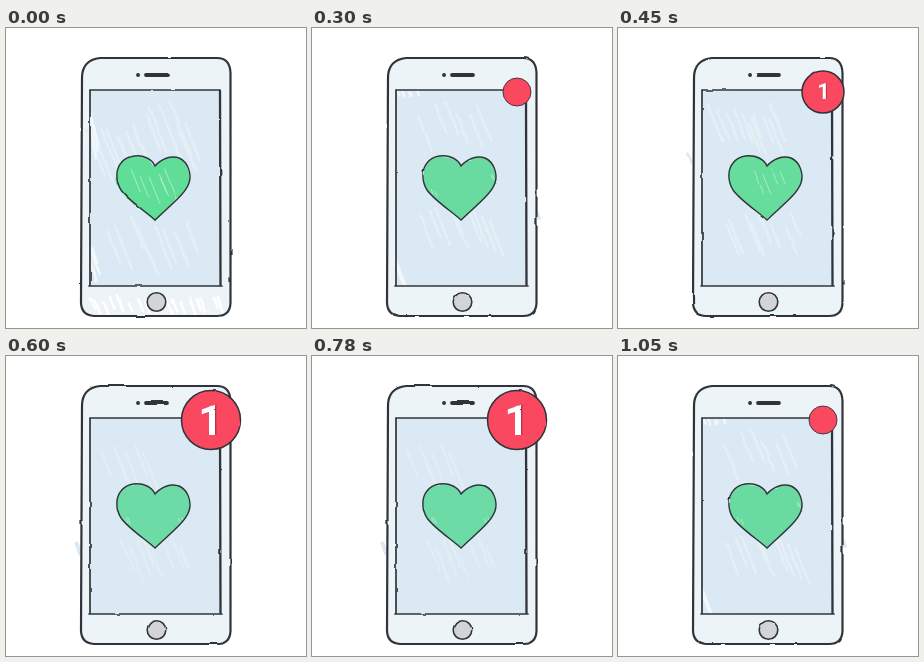
An HTML page that plays this animation: 300 px wide and 300 px high, repeating every 1.2 s.

```html
<!DOCTYPE html>
<html>
<head>
<meta charset="utf-8">
<style>
html, body { margin: 0; width: 100%; height: 100%; overflow: hidden; background: #fff; }
svg { display: block; width: 100vw; height: 100vh; }
text { font-family: Roboto, sans-serif; font-weight: bold; text-anchor: middle; }
</style>
</head>
<body>
<svg id="stage" viewBox="0 0 300 300"></svg>
<script>
const INK = '#30343a', PALE = '#f2f7fa', BLUE = '#dbe9f4';
const BODY = 'M94 30H211Q224 30 224.5 45V275Q224 288 211 288H88Q75 287 75 274L76 50Q76 32 94 30Z';
const HEART = 'M149 192C139 183 122 172 115 162C109 152 110 141 115 135C121 127 133 126 141 130' +
  'Q147 133 149 138C155 131 165 127 173 130C182 134 186 146 183 155C179 167 161 180 149 192Z';

// hatches: x, y, count, spread, length, colour
const poses = [
  { green: '#60de97', shift: '-.5 .8', badge: 0, hatches: [
    [110, 135, 6, 40, 60, '#e4eff7'], [160, 112, 8, 70, 50, '#e4eff7'], [150, 215, 8, 90, 44, '#e4eff7'],
    [87, 112, 3, 4, 44, PALE], [87, 232, 3, 4, 34, PALE], [150, 278, 18, 136, 15, '#fff']],
    nicks: [[150, 158, 6, 44, 28]] },
  { green: '#69daa0', shift: '.5 .5', badge: 14, hatches: [
    [145, 98, 7, 64, 38, '#e4eff6'], [150, 200, 9, 84, 40, '#e4eff6'],
    [87, 240, 3, 5, 22, PALE], [98, 65, 4, 24, 5, PALE], [226, 187, 2, 2, 7, BLUE]],
    nicks: [[122, 165, 2, 8, 6], [180, 150, 2, 4, 8]] },
  { green: '#66dc9d', shift: '0 0', badge: 21, size: 22, digit: [205.5, 71], hatches: [
    [118, 92, 6, 42, 34, '#e5eff6'], [149, 103, 5, 34, 38, '#e5eff6'], [145, 205, 8, 78, 34, '#e5eff6'],
    [71, 130, 2, 2, 8, BLUE]],
    nicks: [[155, 152, 4, 30, 20]] },
  { green: '#6ddba5', shift: '0 .5', badge: 29.5, size: 43, digit: [204.5, 78.5], hatches: [
    [125, 108, 6, 50, 34, '#e3edf5'], [149, 202, 8, 70, 32, '#e3edf5'], [72, 190, 2, 2, 10, BLUE]],
    nicks: [[122, 166, 2, 8, 6], [176, 166, 2, 6, 6]] }
];

function random(seed) {
  return () => (seed = (seed * 16807) % 2147483647) / 2147483647;
}

function hatch([x, y, count, spread, length, colour = '#b9f0d0'], rnd, width) {
  let d = '';
  for (let i = 0; i < count; i++) {
    const cx = x + ((i + rnd()) / count - .5) * spread;
    const cy = y + (rnd() - .5) * length * .5;
    const h = length * (.3 + rnd() * .25);
    const lean = Math.min(h * .4, spread);
    d += `M${cx - lean} ${cy - h}L${cx + lean} ${cy + h}`;
  }
  return `<path d="${d}" fill="none" stroke="${colour}" stroke-width="${width}" stroke-linecap="round"/>`;
}

function roughen(id, seed, wobble) {
  return `<filter id="${id}" filterUnits="userSpaceOnUse" x="0" y="0" width="300" height="300"
      color-interpolation-filters="sRGB">
    <feTurbulence type="fractalNoise" baseFrequency=".05" numOctaves="2" seed="${seed}"/>
    <feDisplacementMap in="SourceGraphic" scale="${wobble}" xChannelSelector="R" yChannelSelector="G"/>
    <feGaussianBlur stdDeviation=".35"/>
  </filter>`;
}

function badge({ badge: r, size, digit }) {
  if (!r) return ['', ''];
  const disc = `<circle cx="205" cy="64" r="${r}" fill="#fb4861"/>`;
  let lines = `<circle cx="205" cy="64" r="${r}" stroke-width="${r > 14 ? 1.5 : .9}"/>`;
  if (digit) {
    const one = (dx, fill) =>
      `<text x="${digit[0] + dx}" y="${digit[1]}" font-size="${size}" fill="${fill}" stroke="none">1</text>`;
    lines += one(size / 30, '#a92c40') + one(0, '#fff');
  }
  return [disc, lines];
}

function draw(pose, i) {
  const rnd = random(731 + i * 97);
  const [disc, rim] = badge(pose);
  return `<g>
    ${roughen('fill' + i, 3 + i, 3)}${roughen('line' + i, 20 + i, 2)}
    <g filter="url(#fill${i})">
      <path d="${BODY}" fill="#edf4f8"/>
      <path d="M84 62H214V258H84Z" fill="${BLUE}"/>
      ${pose.hatches.map(h => hatch(h, rnd, 2.5)).join('')}
      <path d="${HEART}" transform="translate(${pose.shift})" fill="${pose.green}"/>
      ${pose.nicks.map(h => hatch(h, rnd, .8)).join('')}
      <circle cx="150.5" cy="274" r="9" fill="#d2d4d6"/>
    </g>
    <g filter="url(#line${i})" fill="none" stroke="${INK}" stroke-linecap="round">
      <path d="${BODY}" stroke-width="2.2"/>
      <path d="M84 258V62H214M83 258H216" stroke-width="1.7"/>
      <path d="M214 63L214.5 257" stroke-width="2.3"/>
      <path d="${HEART}" stroke-width="1.4"/>
      <circle cx="150.5" cy="274" r="9.3" stroke-width="1.6"/>
      <path d="M132 47h.1M140 47H161" stroke-width="3.8"/>
    </g>
    <g filter="url(#line${i})">${disc}</g>
    <g filter="url(#line${i})" fill="none" stroke="${INK}">${rim}</g>
  </g>`;
}

const stage = document.getElementById('stage');
stage.innerHTML = poses.map(draw).join('');
const layers = [...stage.children];
const steps = [0, 0, 1, 2, 3, 3, 2, 1];

function tick() {
  const shown = steps[Math.floor(performance.now() % 1200 / 150)];
  layers.forEach((g, i) => g.style.display = i === shown ? '' : 'none');
  requestAnimationFrame(tick);
}
tick();
</script>
</body>
</html>
```
